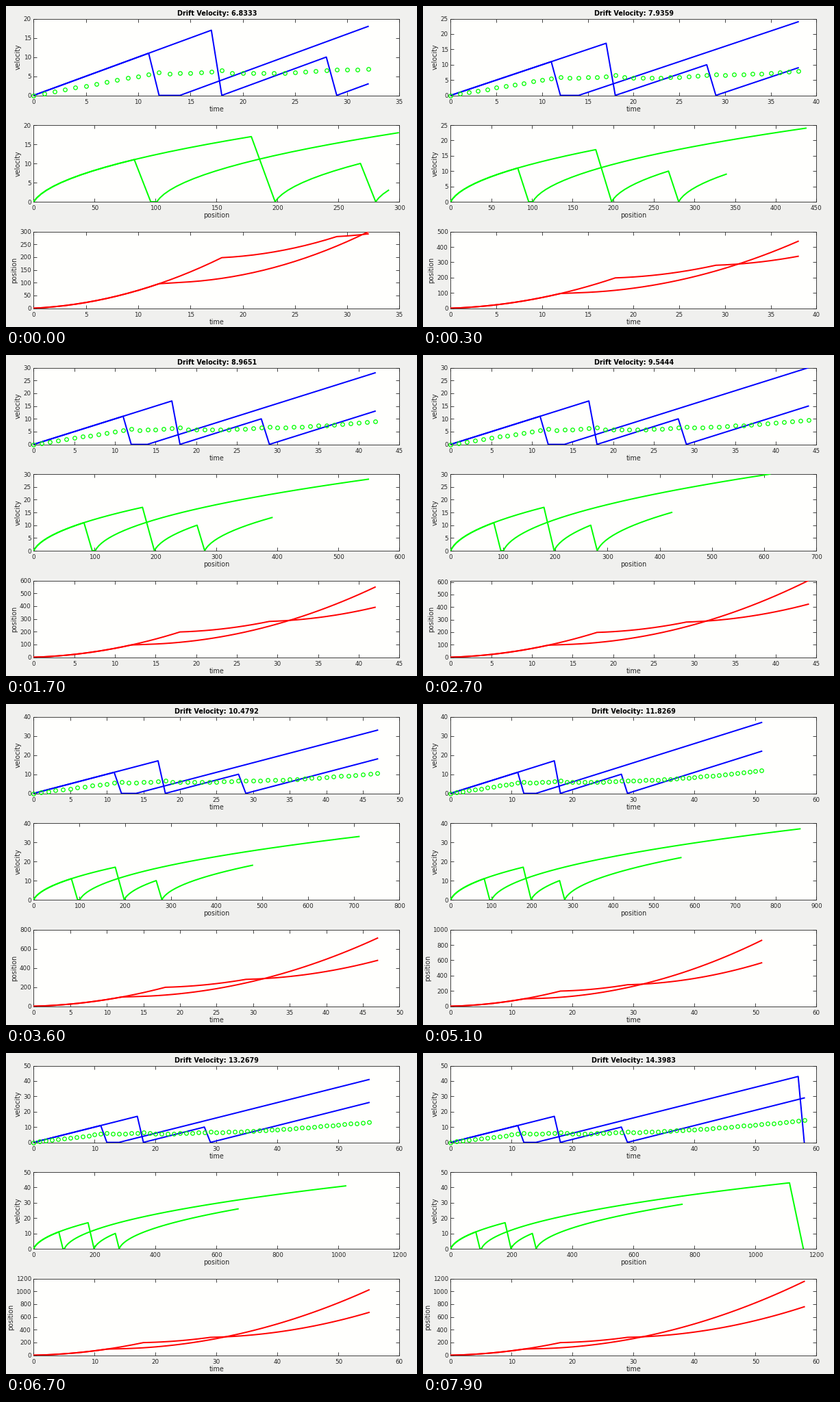
Write a matplotlib script that moves like this. It is 600x469 px and loops after 8000 ms.

```python
import math

import matplotlib.pyplot as plt
import numpy as np
from matplotlib.animation import FuncAnimation

W, H, DPI = 600, 469, 100
PX = 72 / DPI  # points per pixel
INK = "#262626"
LEFT, WIDTH, HEIGHT = 40.4, 534, 112
TOPS = (18.6, 174.0, 329.6)
FRAMES, INTERVAL = 80, 100
LAST = 58

# Collision times of the two electrons
COLLISIONS = ({12, 13, 14, 58}, {18, 29})

# Moments (in tenths of a second) at which the run reaches each step
MOMENTS = (0, 1, 3, 9, 12, 13, 17, 23, 27, 30, 33, 36, 41, 44, 47,
           51, 55, 59, 63, 67, 71, 76, 79)
STEPS = (32, 33, *range(38, LAST + 1))


def simulate():
    """Accelerate both electrons and reset their speed at collisions."""
    vel = np.zeros((2, LAST + 1))
    pos = np.zeros((2, LAST + 1))
    drift = np.zeros(LAST + 1)
    for k in range(1, LAST + 1):
        speed = vel[:, k - 1] + 1
        pos[:, k] = pos[:, k - 1] + speed + 1.5
        drift[k] = (vel[:, :k].sum() + speed.sum()) / (2 * (k + 1))
        for e in range(2):
            vel[e, k] = 0 if k in COLLISIONS[e] else speed[e]
    return vel, pos, drift


def nice_axis(top, most):
    """Upper limit and tick step with no more than `most` intervals."""
    for step in (5, 10, 20, 50, 100, 200, 500):
        if math.ceil(top / step) <= most:
            return math.ceil(top / step) * step, step
        if top / step < most * 1.019:
            return top, step


def short_number(x):
    return f"{x:.{math.floor(math.log10(x)) + 5}g}"


def put_text(x, y, text="", size=9.6, **kw):
    return fig.text(x / W, 1 - y / H, text, fontsize=size * PX,
                    ha="center", va="baseline", **kw)


def make_panel(top, xlabel, ylabel, color):
    ax = fig.add_axes([LEFT / W, 1 - (top + HEIGHT) / H, WIDTH / W, HEIGHT / H],
                      facecolor="#fffffd")
    for spine in ax.spines.values():
        spine.set(color=INK, linewidth=0.85 * PX)
    ax.tick_params(direction="in", top=True, right=True, length=5.3 * PX,
                   width=0.85 * PX, color=INK, labelcolor=INK,
                   labelsize=8.75 * PX)
    ax.tick_params(axis="x", pad=5.4 * PX)
    ax.tick_params(axis="y", pad=3.6 * PX)
    middle = LEFT + WIDTH / 2
    put_text(middle, top + HEIGHT + 23.3, xlabel, color=INK)
    side = put_text(0, top + HEIGHT / 2, ylabel, color=INK,
                    rotation=90, rotation_mode="anchor")
    lines = [ax.plot([], [], color=color, lw=2 * PX, zorder=3)[0]
             for _ in range(2)]
    return ax, lines, side


def fit_axes(ax, side, xmax, ymax):
    xlim, xstep = nice_axis(xmax, 10)
    ylim, ystep = nice_axis(ymax, 6)
    xticks = np.arange(0, xlim + 1, xstep)
    yticks = np.arange(0, ylim + 1, ystep)
    ax.set_xticks(xticks, [str(int(t)) for t in xticks])
    ax.set_yticks(yticks, [str(int(t)) for t in yticks])
    ax.set_xlim(0, xlim)
    ax.set_ylim(0, ylim)
    side.set_x((32.3 - 5.6 * len(str(int(yticks[-1])))) / W)


def update(frame):
    index = sum(m <= frame for m in MOMENTS) - 1
    n = STEPS[index] + 1
    t = time[:n]
    pairs = ((np.array([t, t]), vel[:, :n]),
             (pos[:, :n], vel[:, :n]),
             (np.array([t, t]), pos[:, :n]))
    for (ax, lines, side), (xs, ys) in zip(panels, pairs):
        for line, x, y in zip(lines, xs, ys):
            line.set_data(x, y)
        fit_axes(ax, side, xs.max(), ys.max())
    dots.set_data(t, drift[:n])
    title.set_text(f"Drift Velocity: {short_number(drift[n - 1])}")
    return []


vel, pos, drift = simulate()
time = np.arange(LAST + 1)

fig = plt.figure(figsize=(W / DPI, H / DPI), dpi=DPI, facecolor="#f0f0ee")
panels = [
    make_panel(TOPS[0], "time", "velocity", "#0000ff"),
    make_panel(TOPS[1], "position", "velocity", "#00ff00"),
    make_panel(TOPS[2], "time", "position", "#ff0000"),
]
dots, = panels[0][0].plot([], [], "o", ms=5.5 * PX, mfc="none", mec="#00ff00",
                          mew=1.3 * PX, clip_on=False, zorder=4)
title = put_text(LEFT + WIDTH / 2 + 0.5, 14, size=9.7, weight="bold",
                 color="black")

anim = FuncAnimation(fig, update, frames=FRAMES, interval=INTERVAL,
                     init_func=lambda: update(0), repeat=True, repeat_delay=0)
plt.show()
```
